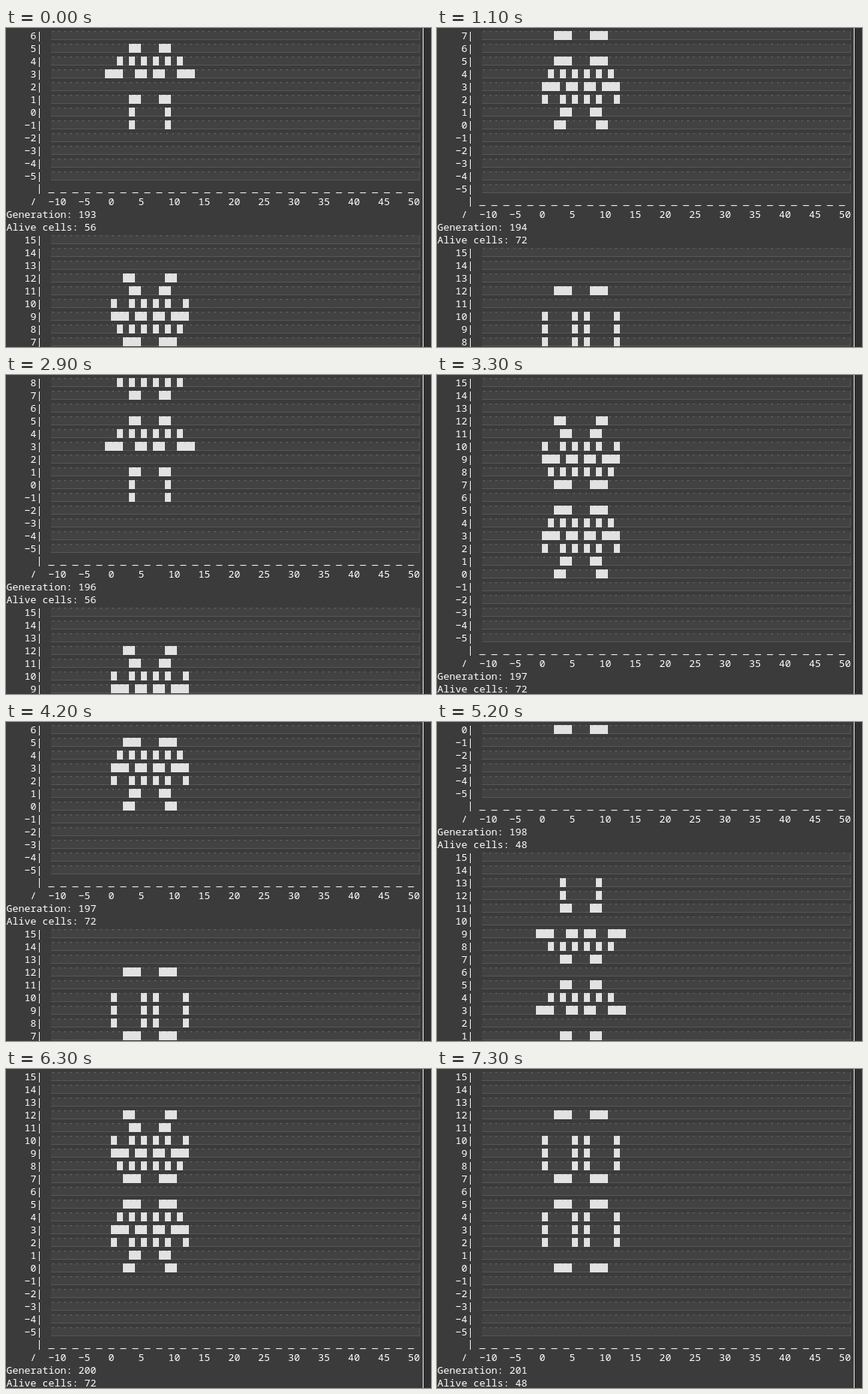
An HTML page with a canvas that plays this animation: 567x425 px, repeating every 8 s.

```html
<!DOCTYPE html>
<html lang="en">
<head>
<meta charset="utf-8">
<title>Game of Life in a terminal</title>
<style>
html, body { margin: 0; height: 100%; overflow: hidden; background: #3b3b3b; }
canvas { display: block; }
</style>
</head>
<body>
<canvas id="stage" width="567" height="425"></canvas>
<script>
const ctx = document.getElementById('stage').getContext('2d');
const LOOP = 8000, TICK = 100, LINE = 17, CHAR = 8, ROWS = 25;
const FIRST_GENERATION = 193;
const X_MIN = -10, X_MAX = 50, Y_MIN = -5, Y_MAX = 15;

// Each print of the next generation: start in ms, lines out at once, duration
const prints = [
  { at: 0, lines: 9 },
  { at: 1100, lines: 8 },
  { at: 2100, lines: 9 },
  { at: 2900, lines: 7, lasts: 400 },
  { at: 4200, lines: 9 },
  { at: 5200, lines: 15 },
  { at: 6100, lines: 8, lasts: 200 },
  { at: 7200, lines: 9 }
];

const key = (x, y) => x + ',' + y;

function collect(isAlive) {
  const cells = new Set();
  for (let y = Y_MIN; y <= Y_MAX; y++)
    for (let x = X_MIN; x <= X_MAX; x++)
      if (isAlive(x, y)) cells.add(key(x, y));
  return cells;
}

// Pulsar centred on (6, 6)
function pulsar(x, y) {
  const a = Math.abs(x - 6), b = Math.abs(y - 6);
  const bar = (u, v) => (u === 1 || u === 6) && v >= 2 && v <= 4;
  return bar(a, b) || bar(b, a);
}

function evolve(cells) {
  return collect((x, y) => {
    let n = 0;
    for (let dy = -1; dy <= 1; dy++)
      for (let dx = -1; dx <= 1; dx++)
        if ((dx || dy) && cells.has(key(x + dx, y + dy))) n++;
    return n === 3 || (n === 2 && cells.has(key(x, y)));
  });
}

const phases = [collect(pulsar)];
while (phases.length < 3) phases.push(evolve(phases.at(-1)));

const minus = n => String(n).replace('-', '\u2212');
const axisLine = '     | ' + '_ '.repeat(31);
let axisLabels = '    /  ';
for (let x = X_MIN; x <= X_MAX; x += 5) axisLabels += minus(x).padEnd(5);

function rect(color, x, y, w, h) {
  ctx.fillStyle = color;
  ctx.fillRect(x, y, w, h);
}

function text(string, baseline) {
  ctx.fillStyle = '#fff';
  ctx.fillText(string, 0.5, baseline);
}

function drawCells(cells, y, top) {
  rect('#575757', 60, top + 4, 492, 12);
  rect('#424242', 60, top + 4, 491, 11);
  for (let x = X_MIN; x <= X_MAX; x++) {
    const left = 140 + x * CHAR, alive = cells.has(key(x, y));
    if (alive) rect('#e2e2e2', left, top + 4, CHAR, 12);
    rect(alive ? '#c4c4c4' : '#666', left + 2, top + 4, 2, 1);
    rect(alive ? '#d4d4d4' : '#555', left + 2, top + 5, 1, 1);
  }
}

function drawLine(generation, index, top) {
  const cells = phases[generation % 3], y = Y_MAX - index;
  const baseline = top + 15;
  if (y >= Y_MIN) {
    drawCells(cells, y, top);
    text(minus(y).padStart(5) + '|', baseline);
  } else if (y === Y_MIN - 1) text(axisLine, baseline - 1);
  else if (y === Y_MIN - 2) text(axisLabels, baseline);
  else if (y === Y_MIN - 3) text('Generation: ' + generation, baseline);
  else text('Alive cells: ' + cells.size, baseline);
}

// Lines scrolled since the first generation filled the screen
function scrolledLines(t) {
  const i = prints.findLastIndex(print => print.at <= t);
  const { at, lines, lasts = TICK } = prints[i];
  const elapsed = Math.floor((t - at) / TICK) * TICK;
  const progress = Math.min(1, elapsed / lasts);
  return i * ROWS + Math.floor(lines + (ROWS - lines) * progress);
}

function draw(t) {
  rect('#3b3b3b', 0, 0, 567, 425);
  rect('#303030', 557, 0, 10, 425);
  rect('#f0f0f0', 556, 0, 1, 425);
  ctx.font = '500 13.333px "Noto Sans Mono", monospace';
  const scrolled = scrolledLines(t);
  for (let row = 0; row < ROWS; row++) {
    const line = scrolled + row;
    drawLine(FIRST_GENERATION + Math.floor(line / ROWS), line % ROWS, row * LINE);
  }
}

const start = performance.now();
function tick() {
  draw((performance.now() - start) % LOOP);
  requestAnimationFrame(tick);
}
tick();
</script>
</body>
</html>
```
